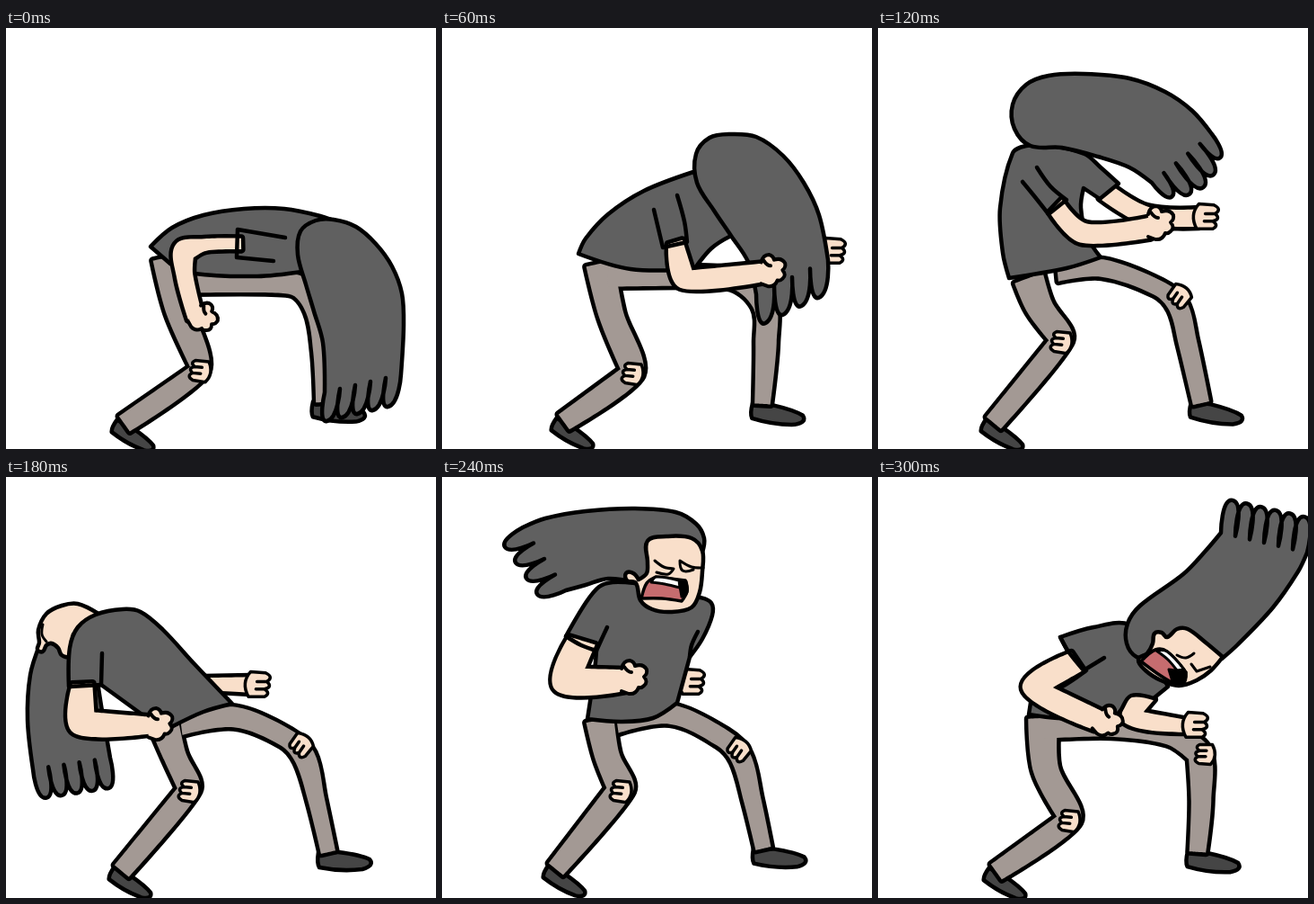
Recreate the animation shown at these times as an HTML page with a canvas. Size 479 by 468 pixels, loop 0.36 s.

```html
<!DOCTYPE html>
<html lang="en">
<head>
<meta charset="utf-8">
<title>Headbanger</title>
<style>
html, body { margin: 0; width: 100%; height: 100%; overflow: hidden; background: #fff; }
canvas { display: block; }
</style>
</head>
<body>
<canvas id="stage" width="479" height="468"></canvas>
<script>
const ctx = document.getElementById('stage').getContext('2d');
const STEP = 60, LINE = 4.5;
const DARK = '#606060', PANTS = '#a39994', SKIN = '#f9dfca', SHOE = '#454545', RED = '#c66c6f';

// "x,y" or "x,y,width"; a trailing "!" marks a sharp corner.
const parse = text => text.trim().split(/\s+/).map(t => {
  const [x, y, w] = t.replace('!', '').split(',').map(Number);
  return { x, y, w, sharp: t.endsWith('!') };
});

// Smooth curve through points; "reach" limits how far a bend spreads.
function spline(pts, closed = true, reach = Infinity) {
  const n = pts.length, path = new Path2D();
  const handle = (i, len) => {
    const p = pts[i % n], a = pts[(i + n - 1) % n], b = pts[(i + 1) % n];
    if (p.sharp || (!closed && (i === 0 || i === n - 1))) return [0, 0];
    const k = Math.min(len / 3, reach) / (Math.hypot(b.x - a.x, b.y - a.y) || 1);
    return [(b.x - a.x) * k, (b.y - a.y) * k];
  };
  path.moveTo(pts[0].x, pts[0].y);
  for (let i = 0; i < (closed ? n : n - 1); i++) {
    const p = pts[i], q = pts[(i + 1) % n];
    const len = Math.hypot(q.x - p.x, q.y - p.y);
    const [ax, ay] = handle(i, len), [bx, by] = handle(i + 1, len);
    path.bezierCurveTo(p.x + ax, p.y + ay, q.x - bx, q.y - by, q.x, q.y);
  }
  if (closed) path.closePath();
  return path;
}

// Limb outline around a centre line: bends are sharp inside and round outside.
function tube(pts) {
  const last = pts.length - 1, left = [], right = [];
  const heading = i => Math.atan2(pts[i + 1].y - pts[i].y, pts[i + 1].x - pts[i].x);
  pts.forEach((p, i) => {
    const end = i === 0 || i === last;
    const from = heading(Math.max(i - 1, 0)), to = heading(Math.min(i, last - 1));
    const turn = Math.atan2(Math.sin(to - from), Math.cos(to - from));
    const dir = from + turn / 2, h = (p.w - LINE) / 2;
    const dx = -Math.sin(dir) * h, dy = Math.cos(dir) * h;
    left.push({ x: p.x - dx, y: p.y - dy, sharp: end || turn < -0.9 });
    right.unshift({ x: p.x + dx, y: p.y + dy, sharp: end || turn > 0.9 });
  });
  return spline([...left, ...right], true, 20);
}

const ink = (path, width = LINE) => () => {
  ctx.lineWidth = width;
  ctx.stroke(path);
};
const paint = (color, path, width) => () => {
  ctx.fillStyle = color;
  ctx.fill(path);
  ink(path, width)();
};
const line = (text, width) => ink(spline(parse(text), false), width);
const blob = (color, text, width) => paint(color, spline(parse(text)), width);
const shirt = text => blob(DARK, text);

// Limbs of one colour melt together inside a common outline.
const limbs = (color, ...lines) => () => {
  const paths = lines.map(tube);
  paths.forEach(p => ink(p, 2 * LINE)());
  ctx.fillStyle = color;
  paths.forEach(p => ctx.fill(p));
};
const arm = text => limbs(SKIN, parse(text));

const stamp = (color, svg, width) => (x, y, angle = 0, size = 1) => {
  const path = new Path2D();
  path.addPath(new Path2D(svg), new DOMMatrix().translate(x, y).rotate(angle).scale(size));
  return paint(color, path, width);
};
const shoe = stamp(SHOE, 'M-11,0 Q-13,12 -10,17 Q15,22 38,19 Q52,15 46,8 Q36,3 11,0Z');
const hand = stamp(SKIN, `M-12,-11 Q-10,-20 -3,-20 Q2,-19 3,-14 Q12,-17 16,-10 Q17,-5 13,-2
  Q18,4 13,8 Q10,11 7,10 Q4,18 -4,17 L-12,14 M-9,-13 q4,6 8,6`, 4);
const knuckles = stamp(SKIN, `M10,-11 L-5,-11 q-6,3 0,7 q-8,2 -2,7 q-7,4 1,8 L8,12
  Q17,2 10,-11Z M-5,-4 h8 M-7,3 h9`, 3.5);
const fist = (x, y, angle = 180) => knuckles(x, y, angle, 1.2);

function legs(left, right, tilt) {
  const [l, r] = [left, right].map(parse);
  const [knee, ankle] = l.slice(-2), heel = r.at(-1);
  return [
    shoe(heel.x, heel.y, tilt), shoe(ankle.x, ankle.y, 27, 0.86),
    limbs(PANTS, l, r), knuckles(knee.x, knee.y + 1, 5)
  ];
}

// The outline's open end is closed by n locks pointing along (dx, dy).
function hair(text, n, dx, dy, bow = 0) {
  const pts = parse(text), a = pts.at(-1), b = pts[0];
  const along = (t, k, sharp) =>
    ({ x: a.x + (b.x - a.x) * t + dx * k, y: a.y + (b.y - a.y) * t + dy * k, sharp });
  for (let i = 0; i < n; i++) {
    const t = (i + 0.5) / n;
    pts.push(along(t, 1 + bow * Math.sin(Math.PI * t), false));
    if (i < n - 1) pts.push(along((i + 1) / n, 0, true));
  }
  return paint(DARK, spline(pts));
}

const poses = [
  [
    legs('180,255,38 193,314,34 215,380,25 132,440,25',
      '190,284,26 320,285,28 344,312,26 350,360,20 353,416,20', 4),
    shirt('161,243! 185,222 220,208 265,201 310,201 350,209 375,218! 330,271! 280,276 210,273 183,262!'),
    arm('262,240,17 222,241,18 199,248,29 199,275,23 211,322,21'),
    hand(219, 323, 40, 0.9),
    line('311,233! 258,224! 257,255! 298,259!'),
    hair(`355,405! 353,350 343,315 334,285 325,252 328,226 345,214 365,213 390,221 412,240
      430,265 441,295 443,330 440,385!`, 5, -6, 34)
  ],
  [
    legs('176,262,36 189,320,32 211,383,30 136,438,25',
      '185,276,28 320,278,26 358,305,30 361,350,28 357,418,22', 6),
    fist(437, 248),
    shirt('152,251! 160,234 185,207 225,181 280,160! 340,225! 322,231 300,245 281,268! 210,268'),
    hair(`350,296! 341,260 322,231 303,203 284,172 283,140 298,122 320,118 350,121 380,142
      403,172 420,208 430,258!`, 4, 0, 37),
    arm('260,238,21 272,279,28 357,272,25'),
    hand(367, 271, 0, 0.95),
    line('236,202 246,244! 273,238! 270,215 262,186')
  ],
  [
    legs('168,278,38 180,310,34 203,348,30 129,439,25',
      '200,272,24 250,267,24 312,289,22 334,309,26 345,350,25 360,417,23', 7),
    knuckles(335, 299, -55),
    arm('252,181,24 298,208,24 358,211,24'),
    fist(367, 210),
    shirt(`150,139 165,131 187,130 230,140 248,155 268,173! 247,190! 229,178! 226,200 233,232
      248,255! 210,267 146,278! 139,250 136,200`),
    arm('198,198,24 229,228,27 303,222,27'),
    hand(313, 218),
    line('161,171 175,188 190,207! 210,191! 192,176 177,155'),
    hair(`305,172! 280,155 245,143 205,133 170,131 152,112 150,85 165,63 190,53 230,51 280,56
      320,71 350,92 372,118!`, 5, 12, 16, 1)
  ],
  [
    arm('220,230,18 272,231,22'),
    fist(282, 231),
    legs('178,280,36 188,310,30 203,348,29 129,438,25',
      '195,275,28 255,267,27 312,290,25 333,312,28 346,360,23 359,417,21', 0),
    knuckles(328, 299, -55),
    hair('116,312! 107,260 102,228! 70,185! 38,185! 27,220 24,270 30,325!', 5, 6, 33),
    blob(SKIN, '37,184 36,170 45,152 62,143 80,141 103,152! 75,175! 70,199 62,198 58,190 51,185 45,187 41,194 35,192'),
    line('41,164 40,175 45,183', 3),
    shirt('70,233! 71,190 80,167 100,153 130,147 150,150 175,170 210,208 252,252! 220,261 186,277! 157,268! 106,231!'),
    arm('85,230,27 87,273,37 162,276,23'),
    hand(170, 276, 0, 0.95),
    line('71,233 106,231! 107,196')
  ],
  [
    legs('176,270,36 184,310,32 198,348,34 127,436,25',
      '195,273,28 255,264,26 312,290,25 333,312,27 346,360,24 358,413,22', 2),
    knuckles(330, 304, -55),
    fist(280, 228),
    shirt(`190,117 175,122 160,140 138,177! 172,193! 170,215 162,269! 200,272 235,268 262,251!
      270,222 276,200! 290,180 301,154 300,140 288,134 240,125! 215,118!`),
    line('276,200 278,187 285,172'),
    hair(`138,126! 160,120 185,113 215,117! 250,100! 290,84! 292,68 283,52 260,39 215,35
      160,38 115,46 90,56!`, 4, -26, 13),
    blob(SKIN, `229,71 250,66 278,68 290,82 290,105 287,128 278,145 255,150 234,147 221,137
      216,118 206,115 205,107 213,107 219,114! 228,107 229,95`),
    line('237,93 247,100 258,102! 252,108 239,106', 3),
    line('291,101 278,100 265,93! 268,104 280,103', 3),
    blob(RED, '222,135! 228,118 238,111! 271,115! 273,127 267,138! 245,135', 3.5),
    blob('#000', '264,116! 272,116! 273,128 267,133!', 3),
    blob('#fff', '233,117! 239,111 264,115! 265,123! 248,119', 3),
    arm('156,182,35 143,225,45 205,226,28'),
    hand(212, 224),
    line('138,177 155,187 172,193! 177,182 184,167')
  ],
  [
    legs('184,268,38 187,325,33 212,381,31 132,439,25',
      '185,279,28 260,279,24 325,288,24 357,307,30 360,360,27 356,417,23', 5),
    knuckles(363, 308, 0, 0.95),
    arm('296,242,30 285,267,29 345,277,18'),
    fist(355, 276),
    shirt(`203,178! 240,167 280,164 300,190! 323,233! 307,246! 282,243 270,260 262,268! 200,268
      168,264! 172,238! 195,238 232,215! 212,195!`),
    arm('222,205,28 178,235,38 246,271,27'),
    hand(255, 273, 28, 0.95),
    line('203,178 212,194 229,215! 252,201'),
    hair(`478,84! 468,105 440,145 400,187 383,202! 300,198! 288,200 277,185 278,163 292,143
      340,108 365,82 382,62!`, 6, 5, -38),
    blob(SKIN, `306,185 308,174 316,173 322,178 333,169 345,169 365,184 384,200! 371,215
      355,226 335,232 315,226 298,215 290,203 300,196`),
    line('333,198 343,201 352,196', 3),
    line('349,208 355,216! 370,211', 3),
    blob(RED, '293,205! 309,192 322,194 343,217! 340,229 325,227', 3.5),
    blob('#000', '324,214! 343,217! 340,229 328,227!', 3),
    blob('#fff', '310,193! 322,194 341,214! 333,215! 323,203', 3)
  ]
].map(pose => pose.flat());

ctx.lineJoin = ctx.lineCap = 'round';

function loop() {
  ctx.clearRect(0, 0, 479, 468);
  const pose = poses[Math.floor(performance.now() / STEP) % poses.length];
  pose.forEach(part => part());
  requestAnimationFrame(loop);
}
loop();
</script>
</body>
</html>
```
